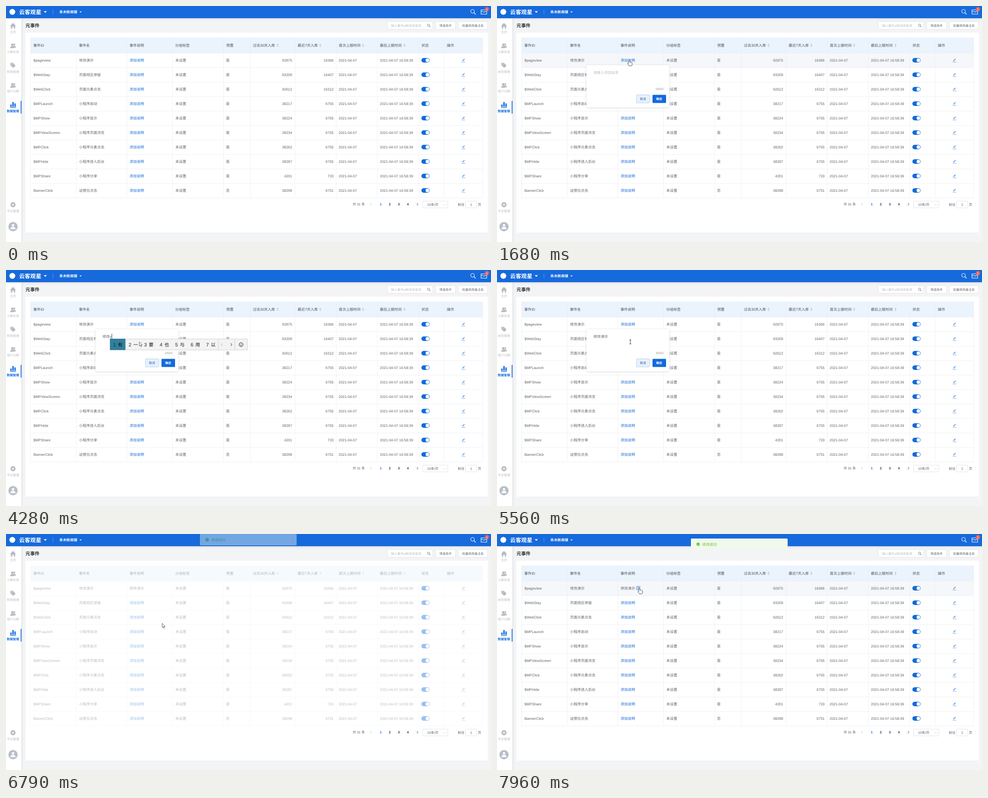
An HTML page that plays this animation: 1073x522 px, repeating every 7.99 s.

```html
<!DOCTYPE html>
<html lang="zh-CN">
<head>
<meta charset="utf-8">
<style>
html, body { margin: 0; width: 100%; height: 100%; overflow: hidden; background: #f3f4f6; }
svg { display: block; }
text { font-family: "Liberation Sans", "Noto Sans CJK SC", "Noto Sans CJK", sans-serif; text-rendering: geometricPrecision; white-space: pre; }
</style>
</head>
<body>
<svg id="stage" width="1073" height="522" viewBox="0 0 1073 522"></svg>
<script>
const BLUE = '#126adb', TEXT = '#606266', DARK = '#303133', PALE = '#b6bac2', LINE = '#ebeef5';
const LOOP = 7990;

// ---- markup helpers (text y is the vertical centre) ----
const text = (x, y, s, size = 8, fill = TEXT, more = '') =>
  `<text x="${x}" y="${y + size * .37}" font-size="${size}" fill="${fill}" ${more}>${s}</text>`;
const rect = (x, y, w, h, fill, more = '') =>
  `<rect x="${x}" y="${y}" width="${w}" height="${h}" fill="${fill}" ${more}/>`;
const path = (d, more = '') => `<path d="${d}" ${more}/>`;
const circle = (x, y, r, fill, more = '') => `<circle cx="${x}" cy="${y}" r="${r}" fill="${fill}" ${more}/>`;
const group = (more, ...parts) => `<g ${more}>${parts.join('')}</g>`;
const at = (x, y, ...parts) => group(`transform="translate(${x} ${y})"`, ...parts);
const stroke = (color, w = 1) => `fill="none" stroke="${color}" stroke-width="${w}"`;
const BOLD = 'font-weight="700"', MID = 'text-anchor="middle"', END = 'text-anchor="end"';
const box = (x, y, w, h, color = '#dcdfe6', fill = '#fff') =>
  rect(x + .5, y + .5, w - 1, h - 1, fill, `rx="1.5" stroke="${color}" stroke-width=".8"`);
const lens = (x, y, r, color, w) =>
  at(x, y, circle(-r * .2, -r * .2, r, 'none', `stroke="${color}" stroke-width="${w}"`),
    path(`M${r * .6} ${r * .6}L${r * 1.5} ${r * 1.5}`, stroke(color, w * 1.3)));

// ---- page frame ----
function topBar() {
  return group('', rect(0, 0, 1073, 27, BLUE, 'filter="url(#soft)"'),
    circle(14, 13, 6.5, '#fff'),
    text(29, 13, '云客观星', 12.3, '#fff', BOLD),
    path('M83.5 11.5h7l-3.5 3.8zM162.5 12h5l-2.5 2.7z', 'fill="#fff"'),
    rect(103.5, 8, .8, 11, '#6ea3ea'),
    text(118, 13, '禾木新商铺', 7.9, '#fff', BOLD),
    lens(1033, 12.5, 4, '#fff', 1.1),
    path('M1051 8.5h12.5v9.5h-12.5zM1051 12h3.5q2.7 3 5.5 0h3.5', stroke('#fff', 1.1)),
    circle(1064, 7, 4.8, '#e8635f'),
    text(1064, 7, '1', 6.8, '#fff', MID));
}

function sideBar() {
  const person = (x, y, s) => at(x, y, circle(0, -2.6 * s, 2.8 * s, PALE),
    path(`M${-4.8 * s} ${5 * s}Q${-4.8 * s} ${.5 * s} 0 ${.5 * s}T${4.8 * s} ${5 * s}Z`, `fill="${PALE}"`));
  const people = y => person(18, y - .3, .85) + at(14, y, circle(0, -2.6, 3.4, '#fff')) + person(14, y + .3, 1);
  const teeth = [0, 45, 90, 135].map(a => rect(-1.4, -6, 2.8, 12, PALE, `rx=".8" transform="rotate(${a})"`));
  const labels = [['主页', 57.5], ['人群实验', 101.5], ['标签管理', 145], ['用户分群', 188.5], ['平台管理', 453]];
  return group('', rect(0, 27, 34, 495, '#fff', 'filter="url(#soft)"'),
    path('M15.5 37.5L22 43.8H20.3V50H17.2V46H13.8V50H10.7V43.8H9Z', `fill="${PALE}"`),
    people(88), people(175.5),
    path('M9.5 125.5h5.5l6.2 6.2l-5.2 5.3l-6.5-6.3z', `fill="${PALE}"`),
    circle(12, 128, 1, '#fff'),
    path('M9.5 218h3v5h-3zM14 212.5h3v10.5h-3zM18.5 215.5h3v7.5h-3zM9 224h13v1.2h-13z', `fill="${BLUE}"`),
    at(15.5, 439.5, ...teeth, circle(0, 0, 4.5, PALE), circle(0, 0, 1.9, '#fff')),
    circle(15.5, 488, 10.3, '#b9bfc9'),
    circle(15.5, 485, 2.7, '#fff'),
    path('M10 493.5Q10 488.5 15.5 488.5T21 493.5Z', 'fill="#fff"'),
    ...labels.map(([s, y]) => text(15.5, y, s, 6.8, PALE, MID)),
    text(15.3, 232.5, '数据管理', 6.8, BLUE, MID + ' ' + BOLD),
    rect(32.5, 210, 1.8, 28, BLUE));
}

function tools() {
  return group('', text(43, 43, '元事件', 10.4, DARK, BOLD),
    box(843, 34, 102, 18), text(852, 43.3, '输入事件id和名称查询', 6.8, PALE), lens(935.3, 43, 2.5, TEXT, .8),
    box(950, 34, 45, 18), text(972.5, 43.3, '筛选条件', 6.8, TEXT, MID),
    box(1000, 34, 66, 18), text(1033, 43.3, '批量修改备注名', 6.8, TEXT, MID));
}

// ---- table ----
const COLS = [54, 155, 267, 368, 481, 540, 639, 730, 821, 913, 969, 1054];
const HEADS = ['事件ID', '事件名', '事件说明', '分组标签', '预置', '过去30天入库', '最近7天入库', '首次上报时间', '最后上报时间', '状态', '操作'];
const ROWS = [
  ['$pageview', '修改演示', 92875, 16366], ['$WebStay', '页面视区停留', 93209, 16407],
  ['$WebClick', '页面元素点击', 92612, 16312], ['$MPLaunch', '小程序启动', 38217, 6755],
  ['$MPShow', '小程序显示', 38224, 6755], ['$MPViewScreen', '小程序页面浏览', 38234, 6755],
  ['$MPClick', '小程序元素点击', 38262, 6755], ['$MPHide', '小程序进入后台', 38287, 6755],
  ['$MPShare', '小程序分享', 4201, 733], ['BannerClick', '运营位点击', 38298, 6751]];

function row([id, name, month, week], i) {
  const y = 119.6 + 32 * i;
  return group('', rect(54, 104 + 32 * i, 1000, 32, '#f5f7fa', 'class="hover" opacity="0"'),
    text(60.7, y, id), text(161.7, y + .5, name),
    text(273.6, y, '添加说明', 8, BLUE, i ? '' : 'id="note"'),
    text(374.7, y, '未设置'), text(486.7, y, i < 9 ? '是' : '否'),
    text(633, y, month, 8, TEXT, END), text(724.8, y, week, 8, TEXT, END),
    text(736, y, '2021-04-07', 7.9), text(827.3, y, '2021-04-07 16:58:39', 7.9),
    rect(919, y - 4.6, 18, 10, BLUE, 'rx="5"'), circle(932.2, y + .4, 3.9, '#fff'),
    at(1012, y, path('M-2.2 2L2.4-2.6', stroke('#4d90e6', 1.7)), path('M-3.8 4.4H4', stroke('#4d90e6', .8))));
}

function table() {
  const sorts = [601, 695.3, 790, 881.7].map(x =>
    path(`M${x - 2.5} 86.2h5l-2.5-2.7zM${x - 2.5} 87.8h5l-2.5 2.7z`, 'fill="#c0c4cc"'));
  const grid = COLS.map(x => `M${x + .5} 70V424`).join('') +
    Array.from({ length: 11 }, (_, i) => `M54 ${104.5 + 32 * i}H1054.5`).join('');
  return group('', rect(54, 70, 1001, 34, '#ebf3fd'),
    ...HEADS.map((s, i) => text(COLS[i] + 6.2, 87, s, 8, '#4b4f57')), ...sorts,
    ...ROWS.map(row), path(grid, stroke(LINE, .8)),
    at(312.5, 119.3, group('id="edit"',
      path('M1-3.5H-3.5V4H3.5V0M-1 1.5L-.7-.3L3.2-4.2L4.4-3L.6 1.1Z', stroke('#2d7de2', 1)))),
    rect(54, 70, 1001, 355, '#fff', 'id="mask"'));
}

function pager() {
  return group('', text(766.8, 438.5, '共 31 条', 7.4),
    path('M808.5 436l-2.5 2.7l2.5 2.7', stroke('#b0b4bc', .9)),
    ...[1, 2, 3, 4].map(n => text(809 + 20 * n, 438.5, n, 7.4, n > 1 ? '#253a5c' : BLUE, MID + ' ' + BOLD)),
    path('M909 436l2.5 2.7l-2.5 2.7', stroke(DARK, .9)),
    box(921, 431, 57, 16), text(931.7, 439.2, '10条/页', 7.4),
    path('M968 438.5l2.3 2.2l2.3-2.2', stroke('#c0c4cc', .8)),
    text(999.5, 439.2, '前往', 7.4), box(1016, 431, 26, 16),
    text(1029, 439.2, '1', 7.4, TEXT, MID), text(1044, 439.2, '页', 7.4));
}

// ---- floating parts ----
function popup() {
  return group('id="popup"', rect(198, 131, 183, 93, '#fff', 'rx="2" filter="url(#soft)"'),
    text(213.6, 147, '请输入添加信息', 7.9, PALE, 'id="hint"'),
    text(213.6, 147, '', 8, TEXT, 'id="typed"'),
    rect(213.7, 141, .9, 11, '#222', 'id="caret"'),
    text(368.2, 183.3, '0/500', 6.8, '#909399', 'id="count" ' + END),
    box(308, 196, 30.5, 19, '#a9caf3', '#e7f0fb'), text(323, 205.6, '取消', 6.8, '#2a5fa8', MID),
    rect(344, 196.5, 30, 18, BLUE, 'rx="1.5" id="ok"'),
    text(358.8, 205.6, '确定', 6.8, '#fff', MID + ' ' + BOLD));
}

function toast() {
  return group('id="toast"', rect(429, 10, 214, 25, '#f0f9eb', 'rx="2"'),
    circle(445, 22.6, 3.7, '#67c23a'), path('M443.2 22.6l1.4 1.4l2.4-2.6', stroke('#fff', .8)),
    text(454.3, 22.6, '修改成功', 8, '#67c23a'));
}

const ARROW = path('M0 0V9.3L2.2 7.3L3.7 10.7L5.2 10L3.7 6.7H6.6Z', 'fill="#fff" stroke="#222" stroke-width=".7"');
const HAND = path('M-1.2 7V.4Q-1.2-.8 0-.8T1.2 .4V4Q3 3.4 3.2 4.6Q5 4 5.2 5.2Q7 5 7 6.4V9Q7 11 5.6 12.4H0Q-1.4 10-3 7.6Q-3.4 6-1.2 7Z', 'fill="#fff" stroke="#222" stroke-width=".8"');
const BEAM = path('M-2-4.5H2M0-4.5V4.5M-2 4.5H2', stroke('#222', .9));

document.getElementById('stage').innerHTML =
  `<defs><filter id="soft" x="-10%" y="-20%" width="120%" height="145%">
    <feDropShadow dx="0" dy="1" stdDeviation="2.5" flood-color="#000" flood-opacity=".14"/></filter></defs>` +
  rect(0, 0, 1073, 522, '#f3f4f6') + rect(43, 59, 1023, 442, '#fff') +
  sideBar() + topBar() + tools() + table() + pager() + popup() + group('id="ime"') + toast() + group('id="cursor"');

// ---- timeline ----
const MOVES = [[440, 1072, 520], [1230, 292, 120], [1840, 292, 120], [2510, 295, 159], [5560, 295, 159],
  [5900, 349, 207], [5990, 345, 201], [6600, 345, 201], [6950, 346, 195], [7010, 346, 195],
  [7130, 347, 194], [7290, 347, 194], [7960, 315, 120]];

// time, committed text, pinyin being typed, candidates
const XIU = '修改 修盖 秀改 休改 袖盖 绣改 修该', YAN = '演示 掩饰 验尸 眼屎 岩石 延时 研师';
const TYPING = [
  [0, '', '', ''],
  [3650, '', 'x', '小 下 想 系 新 向 学'], [3710, '', 'xi', '系 西 洗 喜 细 希 习'],
  [3770, '', 'xiu', '修 秀 休 袖 绣 羞 嗅'], [3830, '', "xiu'g", XIU],
  [3890, '', "xiu'ga", XIU], [3950, '', "xiu'gai", XIU], [4050, '修改', '', ''],
  [4280, '修改', 'y', '有 一 要 也 与 用 以'], [4340, '修改', 'ya', '呀 压 亚 牙 鸭 雅 押'],
  [4400, '修改', 'yan', '眼 言 严 演 烟 研 验'], [4460, '修改', "yan's", YAN],
  [4510, '修改', "yan'sh", YAN], [4700, '修改', "yan'shi", YAN], [4810, '修改演示', '', '']];

const ui = id => document.getElementById(id);
const hovers = [...document.querySelectorAll('.hover')];
const clamp = v => Math.max(0, Math.min(1, v));
const between = (t, a, b) => t >= a && t < b;
const show = (id, alpha) => ui(id).setAttribute('opacity', +alpha);

function pointer(t) {
  const n = MOVES.findIndex(m => m[0] > t);
  if (n === 0) return [1200, 600];
  if (n < 0) return MOVES[MOVES.length - 1].slice(1);
  const [t0, x0, y0] = MOVES[n - 1], [t1, x1, y1] = MOVES[n];
  const p = (t - t0) / (t1 - t0), e = p * p * (3 - 2 * p);
  return [x0 + (x1 - x0) * e, y0 + (y1 - y0) * e];
}

function hoverRow(t) {
  const [x, y] = pointer(t);
  const covered = between(t, 1560, 6400) && y > 131;
  if (covered || between(t, 6190, 7290) || x < 54 || x > 1054) return -1;
  return Math.floor((y - 104) / 32);
}

function cursorShape(t, x, y) {
  const link = between(t, 1260, 2510) && y < 127;
  const button = between(t, 5560, 6400) && x > 308 && y > 196;
  if (link || button || (t > 7700 && x < 319 && y < 127)) return HAND;
  const field = between(t, 1840, 3650) || between(t, 5560, 6000);
  return field && y > 137 && y < 192 ? BEAM : ARROW;
}

function imeBar(x, words) {
  if (!words) return '';
  let left = x, cells = '';
  words.split(' ').forEach((w, i) => {
    const width = 24 + 10.3 * w.length;
    if (!i) cells += rect(x, 152, width, 25, '#2f7f9d');
    cells += text(left + 7, 164.8, i + 1, 10.8, '#222') + text(left + 17.5, 164.8, w, 10.3, '#111');
    left += width;
  });
  return rect(x, 152.5, left + 64 - x, 24.5, '#f3f3f3', 'stroke="#cfcfcf" stroke-width=".9"') + cells +
    path(`M${left} 152v25M${left + 36} 152v25`, stroke('#cfcfcf', .9)) +
    path(`M${left + 9} 162l-2.7 3l2.7 3`, stroke('#aaa')) + path(`M${left + 27} 162l2.7 3l-2.7 3`, stroke('#222')) +
    at(left + 50, 165, circle(0, 0, 4.4, 'none', 'stroke="#222"'), circle(-1.6, -1.2, .7, '#222'),
      circle(1.6, -1.2, .7, '#222'), path('M-2.3 1Q0 3.8 2.3 1', stroke('#222', .8)));
}

function draw(t) {
  // row highlight fades over 250 ms
  const recent = Array.from({ length: 10 }, (_, k) => hoverRow(t - 25 * k));
  hovers.forEach((h, i) => h.setAttribute('opacity', recent.filter(r => r === i).length / 10));

  const saved = t >= 6400;
  ui('note').textContent = saved ? '修改演示' : '添加说明';
  ui('note').setAttribute('fill', saved ? TEXT : BLUE);
  show('edit', t > 7290 && hoverRow(t) === 0);
  show('mask', .6 * Math.sin(Math.PI * clamp((t - 6680) / 270)));

  const [, done, pinyin, words] = TYPING.filter(s => s[0] <= t).pop();
  ui('typed').textContent = done + pinyin;
  show('hint', !(done + pinyin));
  ui('count').textContent = done.length + '/500';
  ui('caret').setAttribute('x', 213.7 + ui('typed').getComputedTextLength());
  show('caret', between(t, 2440, 2970) || between(t, 3500, 5330) || between(t, 5860, 6190));
  show('popup', Math.min(clamp((t - 1530) / 150), clamp((6400 - t) / 150)));
  ui('ime').innerHTML = imeBar(done ? 230 : 214, words);

  const [x, y] = pointer(t);
  ui('ok').setAttribute('fill', between(t, 5560, 6400) && x > 344 && y > 196 ? '#4188e2' : BLUE);

  const p = clamp((t - 6680) / 400), rise = (1 - p) ** 3;
  ui('toast').setAttribute('transform', `translate(0 ${-26 * rise})`);
  show('toast', clamp((t - 6680) / 260));

  ui('cursor').innerHTML = cursorShape(t, x, y);
  ui('cursor').setAttribute('transform', `translate(${x} ${y})`);
}

const start = performance.now();
function tick() {
  draw((performance.now() - start) % LOOP);
  requestAnimationFrame(tick);
}
tick();
</script>
</body>
</html>
```
